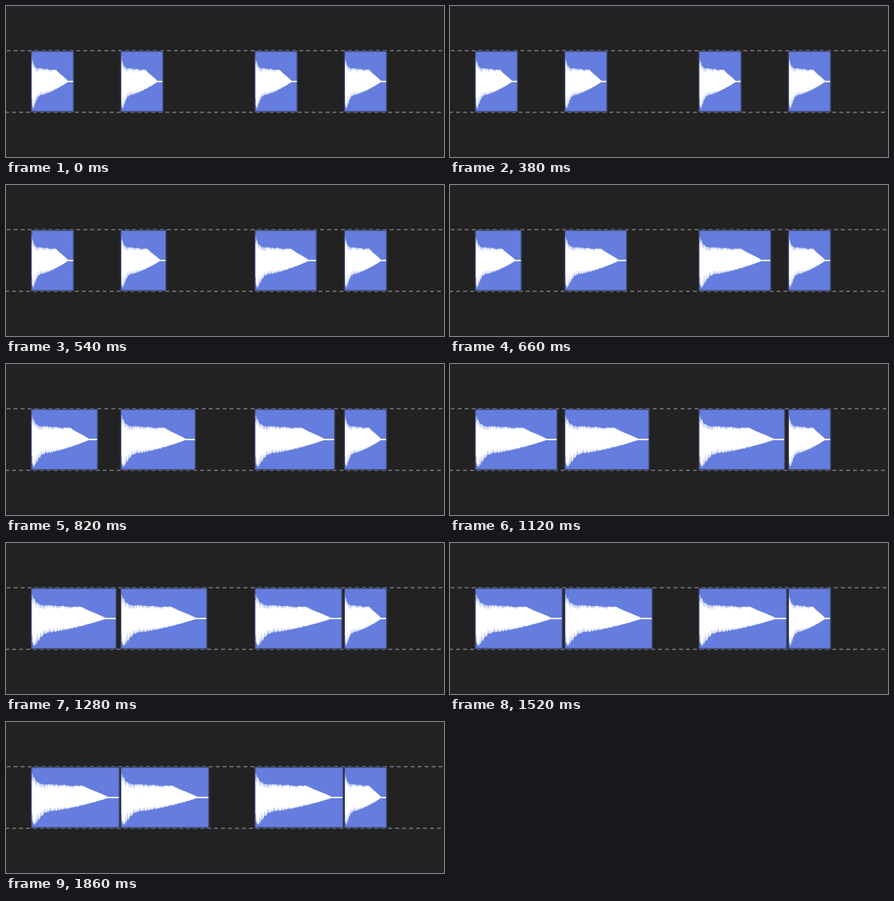
These frames come from a looping animation (566x196 px, 2.2 s). An HTML page with a canvas:

```html
<!DOCTYPE html>
<html lang="en">
<head>
<meta charset="utf-8">
<title>Stretching audio clips</title>
<style>
  html, body { margin: 0; width: 100%; height: 100%; overflow: hidden; background: #222; }
  canvas { display: block; }
</style>
</head>
<body>
<canvas id="stage" width="566" height="196"></canvas>
<script>
const ctx = document.getElementById('stage').getContext('2d');
const LOOP = 2200, SETTLE = 1860, TAU = 245;
const FIRST_START = 408, STAGGER = 116;
const TOP = 58, BOTTOM = 138, MID = 98, BORDER = 1.5;
const BEAT = 57.8, SHORT = 56, GROWTH = 59.5;
const TAIL = .89, SAMPLES = 140;

function random(seed) {
  const s = Math.sin(seed * 127.1 + 11.7) * 43758.5453;
  return s - Math.floor(s);
}

// wave height at u (0..1): a sharp attack on a body that fades to a thin tail
const bell = (u, center, width) => Math.exp(-(((u - center) / width) ** 2));
const fade = (u, power) => Math.max(0, 1 - (u / TAIL) ** power);

function above(u) {
  return 18 * fade(u, 3) + 18 * Math.exp(-u / .04) + 2.5 * bell(u, .59, .08);
}

function below(u) {
  return 21 * fade(u, 1.6) + 15 * bell(u, .03, .08);
}

function wavePath(depth) {
  const path = new Path2D();
  const point = (i, side) => {
    const u = i / SAMPLES;
    const height = side < 0 ? above(u) : below(u);
    const cut = depth * (1 - u) * random(i + side * 200);
    path.lineTo(u, side * Math.max(.7, height * (1 - cut)));
  };
  for (let i = 0; i <= SAMPLES; i++) point(i, -1);
  for (let i = SAMPLES; i >= 0; i--) point(i, 1);
  path.closePath();
  return path;
}

const haze = wavePath(.14), core = wavePath(.45);

function dashedLine(y, offset) {
  ctx.strokeStyle = '#77777f';
  ctx.lineWidth = 1.5;
  ctx.setLineDash([5, 4]);
  ctx.lineDashOffset = offset;
  ctx.beginPath();
  ctx.moveTo(0, y);
  ctx.lineTo(566, y);
  ctx.stroke();
}

function drawClip(x, width) {
  const height = BOTTOM - TOP, inner = width - 2 * BORDER;
  ctx.fillStyle = '#3f4567';
  ctx.fillRect(x, TOP, width, height);
  ctx.fillStyle = '#647dde';
  ctx.fillRect(x + BORDER, TOP + BORDER, inner, height - 2 * BORDER);

  ctx.save();
  ctx.translate(x + BORDER, MID);
  ctx.scale(inner, 1);
  ctx.fillStyle = 'rgba(255, 255, 255, .65)';
  ctx.fill(haze);
  ctx.fillStyle = '#fff';
  ctx.fill(core);
  ctx.restore();
}

// clips sit on beats 0, 2, 5 and 7; the last one keeps its length
const clips = [0, 2, 5, 7].map((beat, i) => ({
  x: 32 + beat * BEAT,
  start: i < 3 ? FIRST_START + (2 - i) * STAGGER : Infinity
}));

function draw(now) {
  const t = Math.min(now % LOOP, SETTLE);
  ctx.fillStyle = '#222';
  ctx.fillRect(0, 0, 566, 196);
  dashedLine(TOP, -1);
  dashedLine(BOTTOM, 1);
  for (const { x, start } of clips) {
    const grown = t > start ? 1 - Math.exp((start - t) / TAU) : 0;
    drawClip(x, SHORT + GROWTH * grown);
  }
}

const began = performance.now();
function tick() {
  draw(performance.now() - began);
  requestAnimationFrame(tick);
}
tick();
</script>
</body>
</html>
```
